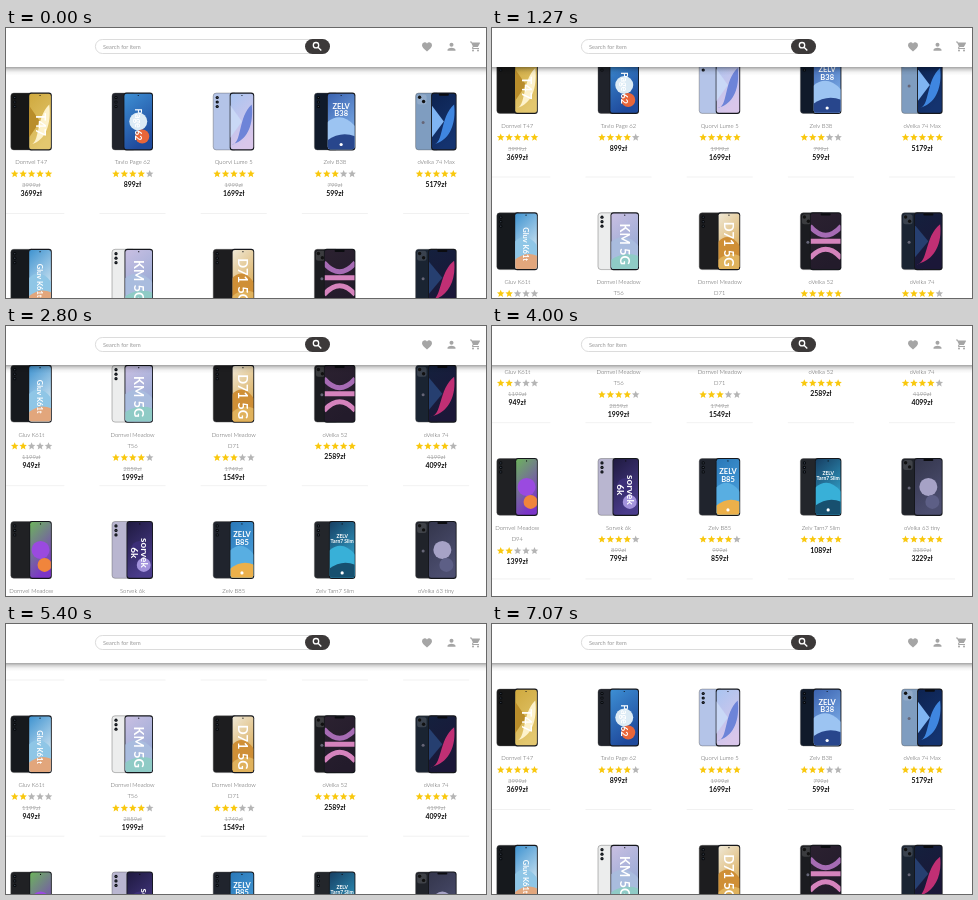
Write an HTML page that moves like this. It is 480 px wide and 270 px high and loops after 7.27 s.

```html
<!DOCTYPE html>
<html lang="en">
<head>
<meta charset="utf-8">
<title>Phone shop</title>
<style>
  html, body { margin: 0; width: 100%; height: 100%; overflow: hidden; background: #fff; }
  svg { display: block; width: 480px; height: 270px; }
  text { font-family: Lato, "Open Sans", sans-serif; text-anchor: middle; }
  .name { font-size: 5.9px; font-weight: 300; fill: #555; }
  .old { font-size: 6px; fill: #aaa; text-decoration: line-through; }
  .price { font-size: 6.9px; font-weight: 700; fill: #111; }
  .ad { font-weight: 700; fill: #fff; }
  .hint { font-size: 5.7px; fill: #999; text-anchor: start; }
</style>
</head>
<body>
<svg viewBox="0 0 480 270">
  <defs>
    <path id="star" d="M12 17.27 18.18 21l-1.64-7.03L22 9.24l-7.19-.61L12 2 9.19 8.63 2 9.24l5.46 4.73L5.82 21z"/>
    <linearGradient id="shade" x2="0" y2="1">
      <stop stop-color="#000" stop-opacity=".36"/>
      <stop offset=".3" stop-color="#000" stop-opacity=".17"/>
      <stop offset=".6" stop-color="#000" stop-opacity=".05"/>
      <stop offset="1" stop-color="#000" stop-opacity="0"/>
    </linearGradient>
  </defs>
  <g id="list"></g>
  <rect y="39" width="480" height="8.5" fill="url(#shade)"/>
  <rect width="480" height="39" fill="#fff"/>
  <rect x="89.400" y="11.500" width="234" height="14" rx="7" fill="#fff" stroke="#d4d4d4" stroke-width=".8"/>
  <rect x="299" y="11" width="25" height="15" rx="7.500" fill="#3c3939"/>
  <g fill="none" stroke="#fff" stroke-width="1.300">
    <circle cx="310" cy="17.200" r="2.700"/><path d="M312 19.200l3.300 3.300"/>
  </g>
  <text class="hint" x="97" y="20.600">Search for item</text>
  <g fill="#a5a5a5">
    <path transform="translate(415 13) scale(.5)" d="M12 21C5 15 2 12.300 2 8.500A5.500 5.500 0 0 1 12 5.100 5.500 5.500 0 0 1 22 8.500C22 12.300 19 15 12 21z"/>
    <circle cx="445.500" cy="16.700" r="2"/>
    <path d="M441.500 22.700v-1c0-1.300 2.600-2 4-2s4 .7 4 2v1z"/>
    <path transform="translate(463.500 12.500) scale(.5)" d="M1 2h3.300l1 2H20q1.500 0 .9 1.500L17.300 12q-.6 1-1.800 1H8.100l-1 2H19v2H7q-3 0-1.800-3l1.400-2.400L3 4H1z"/>
    <circle cx="467" cy="22.500" r="1"/><circle cx="472" cy="22.500" r="1"/>
  </g>
</svg>
<script>
// name lines, rating, old price, price, back, front's left edge,
// wallpaper, its colours (top, bottom, two accents), ad lines, style, ad size
const products = [
  [['Dornvel T47'], 5, 3999, 3699, '#171717', -3, 'leaf', ['#cfa93e', '#e3c76f', '#fdf2cc', '#b98d2a'], ['T47'], 'down', 13],
  [['Tavlo Page 62'], 4, 0, 899, '#20232b', -9, 'disc', ['#3d8fd4', '#1f4a9c', '#dcebf5', '#e8663a'], ['Page 62'], 'down', 9],
  [['Quorvi Lume 5'], 5, 1999, 1699, '#b4c4e8', -4, 'leaf', ['#a9c4f0', '#d9c6ea', '#6d84d8', '#c9d8f6'], []],
  [['Zelv B38'], 3, 799, 599, '#101a2a', -8, 'wave', ['#3b63b0', '#7fb0ea', '#9cc4f2', '#28468c'], ['ZELV', 'B38'], 'across', 7.5],
  [['oVelka 74 Max'], 5, 0, 5179, '#7f9dc0', -5, 'leaf', ['#0d2350', '#14336f', '#3f86e0', '#7fb4f2'], [], 'bump'],
  [['Gluv K61t'], 2, 1199, 949, '#16191d', -3, 'wave', ['#3f93d0', '#dcecf5', '#8fc6e6', '#e2a67c'], ['Gluv K61t'], 'down', 7.5],
  [['Dornvel Meadow', 'T56'], 4, 2859, 1999, '#eceded', -8, 'wave', ['#c9bfe2', '#93a8d4', '#a9bcde', '#8fcbc6'], ['KM 5G'], 'down', 13],
  [['Dornvel Meadow', 'D71'], 3, 1749, 1549, '#1d1d1f', -2, 'wave', ['#efe8d6', '#d9a850', '#cf8f36', '#e0b25c'], ['D71 5G'], 'down', 13],
  [['oVelka 52'], 5, 0, 2589, '#1b1c20', -11, 'bands', ['#2b2130', '#231b2b', '#d583bd', '#a66bb4'], [], 'bump'],
  [['oVelka 74'], 4, 4199, 4099, '#1a2432', -8, 'leaf', ['#14203d', '#1b1738', '#c02f74', '#263f70'], [], 'bump'],
  [['Dornvel Meadow', 'D94'], 2, 0, 1399, '#202124', -2, 'disc', ['#6cb35c', '#7b35c8', '#9a4ae0', '#f0853c'], []],
  [['Sorvek 6k'], 4, 899, 799, '#b9b6d0', -6, 'disc', ['#1f1a40', '#4a3c8c', '#3c2f78', '#a393dc'], ['sorvek', '6k'], 'down', 10],
  [['Zelv B85'], 4, 999, 859, '#20242d', -4, 'wave', ['#2a78b8', '#4aa0dc', '#58aee2', '#ecb04a'], ['ZELV', 'B85'], 'across', 7.5],
  [['Zelv Tarn7 Slim'], 5, 0, 1089, '#23262b', -6, 'wave', ['#173f63', '#34a9d2', '#38b0d8', '#17506f'], ['ZELV', 'Tarn7 Slim'], 'across', 5],
  [['oVelka 63 tiny'], 5, 3359, 3229, '#20232a', -8, 'disc', ['#34364c', '#4c4e70', '#a6a2c6', '#5d5f86'], [], 'bump'],
];

const edge = 20.5; // half the width of a pair of phones
const dot = (x, y, r, fill) => `<circle cx="${x}" cy="${y}" r="${r}" fill="${fill}"/>`;
const fill = (d, colour) => `<path d="${d}" fill="${colour}"/>`;
const stroke = (d, colour) => `<path d="${d}" fill="none" stroke="${colour}" stroke-width="5"/>`;
const label = (kind, y, s) => `<text class="${kind}" y="${y + 2.3}">${s}</text>`;

const wallpapers = {
  wave: (l, m, a, b) => fill(`M${l} 30Q${m} 18 ${edge} 34V58H${l}z`, a) + fill(`M${l} 48Q${m} 38 ${edge} 44V58H${l}z`, b),
  disc: (l, m, a, b) => dot(m, 29, 9, a) + dot(m + 4, 44, 7, b),
  bands: (l, m, a, b) => stroke(`M${l} 14Q${m} 32 ${edge} 14`, b) + stroke(`M${l} 29H${edge}`, a) + stroke(`M${l} 46Q${m} 28 ${edge} 46`, a),
  leaf: (l, m, a, b) => fill(`M${l} 12L${m} 29L${l} 46z`, b) + fill(`M${l + 2} 52C${m} 52 ${m - 4} 24 18 12C${edge} 34 ${m + 4} 49 ${l + 2} 52z`, a),
};

function ad(lines, style, size, mid) {
  return lines.map((s, i) => {
    const shift = (i - (lines.length - 1) / 2) * size;
    const place = style == 'down'
      ? `translate(${mid - shift - size * .35} 32) rotate(90)`
      : `translate(${mid} ${20 + shift})`;
    return `<text class="ad" font-size="${size}" transform="${place}">${s}</text>`;
  }).join('');
}

function phone(id, back, left, paper, [top, bottom, a, b], lines, style, size) {
  const bump = style == 'bump', mid = (left + edge) / 2;
  const lenses = bump
    ? `<rect x="-19" y="2" width="9.500" height="10" rx="2.500" fill="#fff" fill-opacity=".14"/>`
      + dot(-16.5, 4.8, 1.7, '#111') + dot(-12.5, 9, 1.7, '#111') + dot(-13, 30, 1.5, '#667')
    : [5, 9.5, 14].map(y => dot(-16.5, y, 1.6, '#07090c') + dot(-16.5, y, .6, '#4a5462')).join('');
  const head = bump
    ? `<rect x="${mid - 5}" y="1" width="10" height="2.200" rx="1" fill="#0b0c10"/>`
    : dot(mid, 3, .6, '#0b0c10');
  const mark = style == 'across' ? dot(mid, 52, 1.6, '#fff') : '';
  const glass = `<rect x="${left + .9}" y="1.2" width="${edge - left - 1.8}" height="55.600" rx="2.200"`;
  return `<linearGradient id="g${id}" x2=".4" y2="1"><stop stop-color="${top}"/><stop offset="1" stop-color="${bottom}"/></linearGradient>
    <clipPath id="c${id}">${glass}/></clipPath>
    <rect x="${-edge}" y=".6" width="24" height="56.800" rx="3" fill="${back}" stroke="#555" stroke-width=".4"/>${lenses}
    <rect x="${left}" width="${edge - left}" height="58" rx="3" fill="#15171c"/>
    ${glass} fill="url(#g${id})"/>
    <g clip-path="url(#c${id})">${wallpapers[paper](left, mid, a, b)}</g>${head}${ad(lines, style, size, mid)}${mark}`;
}

function card([names, rating, old, price, ...look], i) {
  const x = 25.3 + i % 5 * 101.2, y = 134 + Math.floor(i / 5) * 156.2;
  const starsY = 11.5 * names.length + .3;
  let out = `<g transform="translate(0 -69.5)">${phone(i, ...look)}</g>`;
  names.forEach((s, n) => out += label('name', n * 11.2, s));
  for (let n = 0; n < 5; n++)
    out += `<use href="#star" fill="${n < rating ? '#f9c80e' : '#b5b5b5'}"
      transform="translate(${(n - 2) * 8.45 - 4.2} ${starsY - 4.5}) scale(.375)"/>`;
  if (old) out += label('old', starsY + 11, old + 'zł');
  out += label('price', starsY + (old ? 20 : 11.1), price + 'zł');
  return `<g transform="translate(${x} ${y})">${out}
    <path d="M-33 51.500H33" stroke="#eee" stroke-width=".8"/></g>`;
}

const list = document.getElementById('list');
list.innerHTML = products.map(card).join('');

// Scroll path: seconds and offset, joined by a monotone cubic curve.
const stops = [[0, 0], [.6, 7], [1.27, 36.7], [2.8, 182], [3.67, 245], [4.43, 245], [5.4, 129.5], [6.33, 50.6], [7.07, 0]];
const rate = i => (stops[i + 1][1] - stops[i][1]) / (stops[i + 1][0] - stops[i][0]);
const slopes = stops.map((_, i) => {
  if (i == 0 || i == stops.length - 1) return 0;
  const a = rate(i - 1), b = rate(i);
  return a * b > 0 ? 2 * a * b / (a + b) : 0;
});

function scrollAt(t) {
  let i = 0;
  while (i < stops.length - 2 && t > stops[i + 1][0]) i++;
  const [t0, y0] = stops[i], [t1, y1] = stops[i + 1];
  const d = t1 - t0, u = Math.min(1, (t - t0) / d), v = 1 - u;
  return y0 * v * v * (1 + 2 * u) + y1 * u * u * (3 - 2 * u)
    + d * u * v * (slopes[i] * v - slopes[i + 1] * u);
}

const start = performance.now();
function draw() {
  const ms = (performance.now() - start) % 7270;
  const t = Math.min(7.07, Math.floor((ms + 4) * .015) / 15); // 15 steps a second
  list.setAttribute('transform', `translate(0 ${-scrollAt(t).toFixed(2)})`);
  requestAnimationFrame(draw);
}
draw();
</script>
</body>
</html>
```
